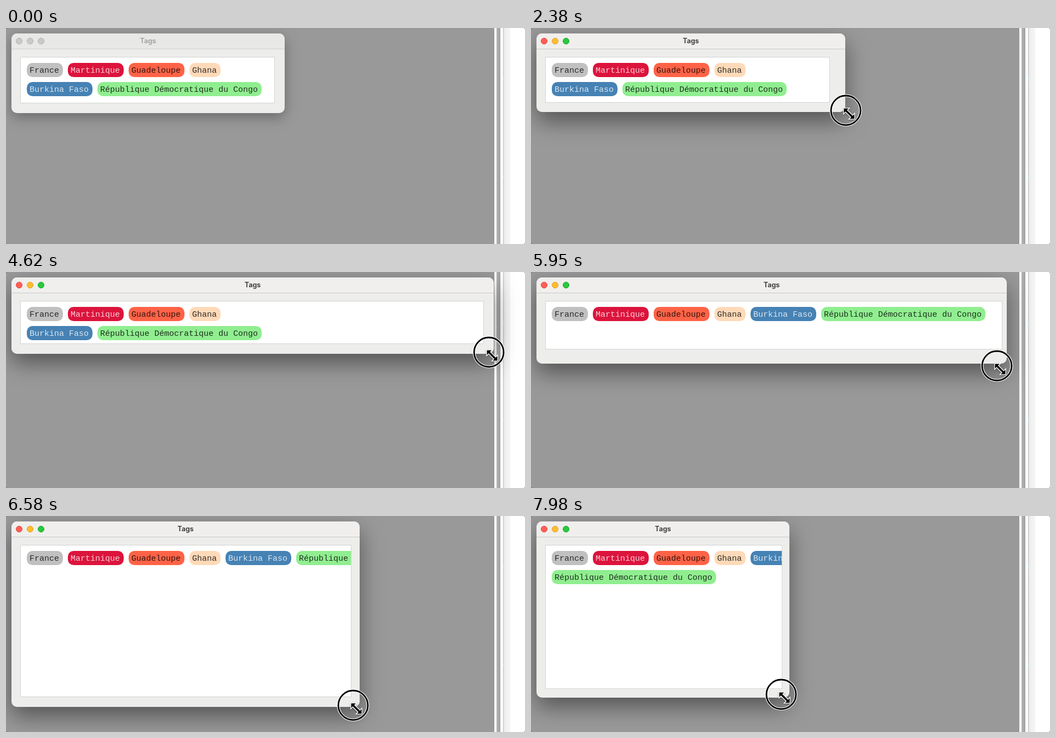
Write an HTML page with a canvas that moves like this. It is 948 by 396 pixels and loops after 8000 ms.

```html
<!DOCTYPE html>
<html lang="fr">
<head>
<meta charset="utf-8">
<title>Tags</title>
<style>
html, body { margin: 0; width: 100%; height: 100%; overflow: hidden; background: #999; }
canvas { display: block; }
</style>
</head>
<body>
<canvas id="stage" width="948" height="396"></canvas>
<script>
const ctx = document.getElementById('stage').getContext('2d');
const LOOP = 8000, STEP = 70, LAG = 25;
const LEFT = 10, TOP = 10;
const ACTIVATE = 770, GRAB = 1610, FIRST_WRAP = 4830, SECOND_WRAP = 7070;

const TAGS = [
  ['France', '#c0c0c0', '#000'],
  ['Martinique', '#dc143c', '#fff'],
  ['Guadeloupe', '#ff6347', '#000'],
  ['Ghana', '#ffdab9', '#000'],
  ['Burkina Faso', '#4682b4', '#fff'],
  ['République Démocratique du Congo', '#90ee90', '#000']
];

// pointer path: time, x, y
const PATH = [
  [0, 310, 440], [70, 280, 400], [350, 130, 170], [630, 77, 55], [770, 77, 55],
  [1540, 500, 154], [2190, 500, 154], [2380, 575, 151], [3010, 799, 152],
  [3200, 840, 150], [3500, 859, 150], [3780, 859, 150], [4410, 882, 147],
  [5670, 882, 147], [5740, 881, 148], [5870, 881, 148], [5950, 851, 172],
  [6480, 646, 347], [6580, 634, 347], [6930, 595, 347], [7540, 595, 347],
  [7930, 468, 332], [7980, 457, 327]
];

function pointerAt(t) {
  const i = PATH.findIndex(key => key[0] > t);
  if (i < 0) return PATH[PATH.length - 1].slice(1);
  const [t0, x0, y0] = PATH[Math.max(i - 1, 0)], [t1, x1, y1] = PATH[i];
  const k = t1 > t0 ? Math.max(0, (t - t0) / (t1 - t0)) : 0;
  return [x0 + (x1 - x0) * k, y0 + (y1 - y0) * k];
}

// bottom-right window corner, dragged by the pointer
function cornerAt(t) {
  const dragStart = 2190;
  if (t <= dragStart) return [509, 156];
  const [x, y] = pointerAt(t);
  const grip = t < 2380 ? 2 + (t - dragStart) / 190 : 3;
  return [Math.round(x + 9), Math.round(y + grip)];
}

function rect(x, y, w, h, fill) {
  ctx.fillStyle = fill;
  ctx.fillRect(x, y, w, h);
}

function roundRect(x, y, w, h, r, fill) {
  ctx.beginPath();
  ctx.roundRect(x, y, w, h, r);
  ctx.fillStyle = fill;
  ctx.fill();
}

function drawDesktop() {
  rect(0, 0, 948, 396, '#999');
  rect(892, 0, 56, 396, '#fff');
  const groove = ctx.createLinearGradient(896, 0, 903, 0);
  groove.addColorStop(0, '#b4b4b4');
  groove.addColorStop(1, '#a2a2a2');
  rect(896, 0, 7, 396, groove);
  rect(908, 0, 1, 396, '#b9bcc2');
  const edge = ctx.createLinearGradient(909, 0, 921, 0);
  edge.addColorStop(0, '#e6e6e6');
  edge.addColorStop(0.4, '#f2f2f2');
  edge.addColorStop(1, '#f5f5f4');
  rect(909, 0, 12, 396, edge);
  for (const y of [90, 270]) rect(908, y, 1, 6, '#a9d6e2');
  for (const x of [0, 947]) for (const y of [0, 395]) rect(x, y, 1, 1, '#333');
}

function drawFrame(right, bottom, active) {
  const w = right - LEFT, h = bottom - TOP;
  ctx.save();
  ctx.shadowColor = active ? 'rgba(0,0,0,.45)' : 'rgba(0,0,0,.3)';
  ctx.shadowBlur = active ? 40 : 24;
  ctx.shadowOffsetY = active ? 17 : 8;
  roundRect(LEFT, TOP, w, h, 10, '#ededeb');
  ctx.restore();
  roundRect(LEFT, TOP, w, 28, [10, 10, 0, 0], active ? '#f0efed' : '#e8e8e6');
  rect(LEFT, 38, w, 1, active ? '#c9c9c8' : '#d0d0cf');

  const lights = active
    ? [['#ff5f57', '#e0443e'], ['#febc2e', '#dea123'], ['#28c840', '#1aab29']]
    : Array(3).fill(['#cbcac8', '#b2b1af']);
  lights.forEach(([fill, line], i) => {
    ctx.beginPath();
    ctx.arc(24 + 20 * i, 24, 5.5, 0, Math.PI * 2);
    ctx.fillStyle = fill;
    ctx.fill();
    ctx.strokeStyle = line;
    ctx.lineWidth = 1;
    ctx.stroke();
  });

  ctx.font = '700 12.5px Inter, sans-serif';
  ctx.textAlign = 'center';
  ctx.fillStyle = active ? '#434342' : '#a5a5a4';
  ctx.fillText('Tags', (LEFT + right) / 2, 28);
}

function drawTags(right, bottom, breakAt) {
  const w = right - 19 - 26, h = bottom - 19 - 53;
  rect(26, 53, w + 1, h + 1, '#d3d3d2');
  rect(27, 54, w - 1, h - 1, '#fff');
  ctx.save();
  ctx.beginPath();
  ctx.rect(27, 54, w - 1, h - 1);
  ctx.clip();
  ctx.font = '15px "Liberation Mono", monospace';
  ctx.textAlign = 'left';
  let x = 38, y = 64;
  TAGS.forEach(([name, fill, ink], i) => {
    if (i === breakAt) { x = 38; y += 35; }
    const width = name.length * 9 + 12;
    roundRect(x, y, width, 26, 10.5, fill);
    ctx.globalAlpha = 0.8;
    ctx.fillStyle = ink;
    ctx.fillText(name, x + 5, y + 18);
    ctx.globalAlpha = 1;
    x += width + 9;
  });
  ctx.restore();
}

const ARROW = [0, 0, 0, 16, 3.7, 12.5, 6.2, 18, 8.6, 17, 6.2, 11.5, 11.3, 11.5];
const HALF_RESIZE = [-9.5, -9.5, -1, -9.5, -4, -6.5, 6.5, 4, 9.5, 1];
const RESIZE = HALF_RESIZE.concat(HALF_RESIZE.map(v => -v));

function drawPolygon(points, x, y) {
  ctx.beginPath();
  for (let i = 0; i < points.length; i += 2) ctx.lineTo(x + points[i], y + points[i + 1]);
  ctx.closePath();
  ctx.save();
  ctx.shadowColor = 'rgba(0,0,0,.35)';
  ctx.shadowBlur = 3;
  ctx.shadowOffsetY = 1;
  ctx.strokeStyle = '#fff';
  ctx.lineWidth = 2.6;
  ctx.stroke();
  ctx.restore();
  ctx.fillStyle = '#000';
  ctx.fill();
}

function drawPointer(x, y, resizing) {
  ctx.beginPath();
  ctx.arc(x, y, 27, 0, Math.PI * 2);
  for (const [color, width] of [['#fff', 5], ['#000', 2.8]]) {
    ctx.strokeStyle = color;
    ctx.lineWidth = width;
    ctx.stroke();
  }
  if (resizing) drawPolygon(RESIZE, x + 6, y + 6);
  else drawPolygon(ARROW, x, y);
}

function draw(t) {
  const breakAt = t < FIRST_WRAP ? 4 : t < SECOND_WRAP ? -1 : 5;
  drawDesktop();
  drawFrame(...cornerAt(t - LAG), t >= ACTIVATE);
  drawTags(...cornerAt(t - 2 * LAG), breakAt);
  drawPointer(...pointerAt(t), t >= GRAB);
}

const start = performance.now();
function tick() {
  const t = (performance.now() - start) % LOOP;
  draw(Math.floor(t / STEP) * STEP);
  requestAnimationFrame(tick);
}
tick();
</script>
</body>
</html>
```
